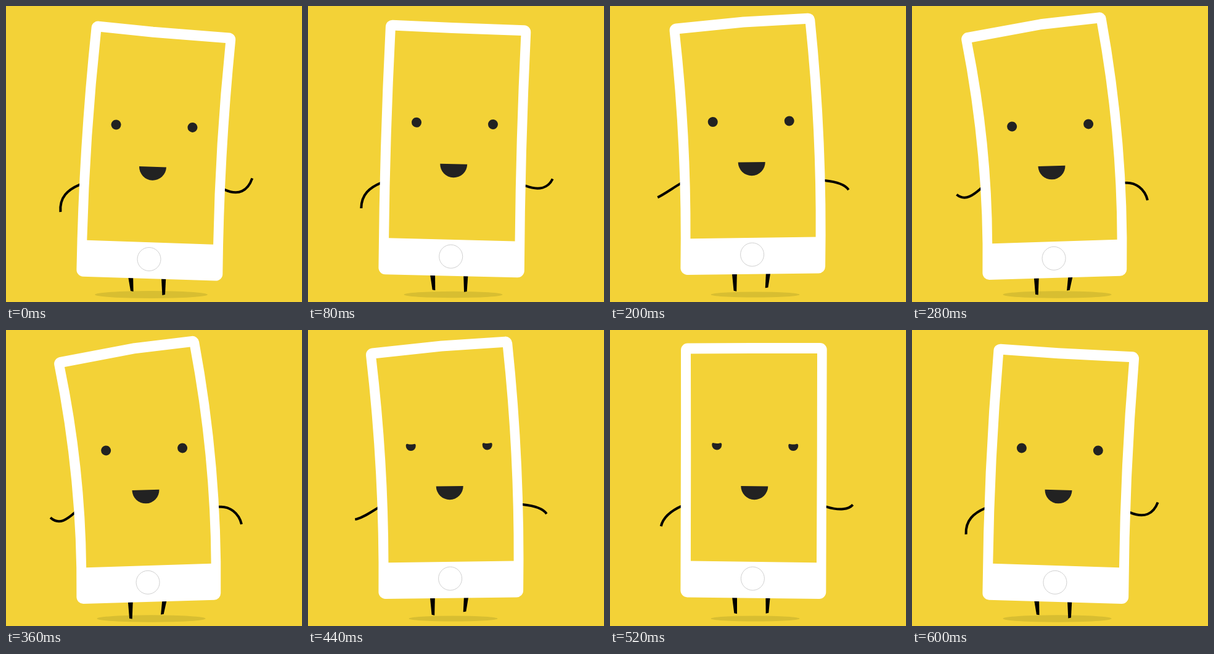
These frames come from a looping animation (480 px wide and 480 px high, 640 ms). An HTML page with a canvas:

```html
<!DOCTYPE html>
<html>
<head>
<meta charset="utf-8">
<style>
html, body { margin: 0; height: 100%; overflow: hidden; background: #f3d237; }
canvas { display: block; }
</style>
</head>
<body>
<canvas id="stage" width="480" height="480"></canvas>
<script>
const ctx = document.getElementById('stage').getContext('2d');
const YELLOW = '#f3d237', DARK = '#222';
const LOOP = 640, STEP = 40;

// Top corners of the screen: time, left x, left y, right x, right y
const TOP = [
  [0, 154, 42, 356, 60],
  [120, 133.5, 39.5, 338, 41],
  [200, 113, 45, 317, 29],
  [280, 97, 59, 300, 28],
  [320, 94, 61.5, 297.5, 28.5],
  [360, 95, 60, 298.5, 27.5],
  [440, 110.5, 46, 316, 28],
  [520, 131, 38.5, 336, 38],
  [600, 148, 40, 352, 52]
];

// Key i of the endless track, with its time unwrapped
function key(i) {
  const n = TOP.length, [time, ...values] = TOP[(i + n) % n];
  return { time: time + Math.floor(i / n) * LOOP, values };
}

// Smooth periodic curve through the keys
function topAt(t) {
  const i = TOP.findLastIndex(k => k[0] <= t);
  const [a, b, c, d] = [-1, 0, 1, 2].map(j => key(i + j));
  const span = c.time - b.time, u = (t - b.time) / span;
  return b.values.map((v, j) => {
    const m0 = (c.values[j] - a.values[j]) / (c.time - a.time) * span;
    const m1 = (d.values[j] - v) / (d.time - b.time) * span;
    const w = u * u * (3 - 2 * u);
    return v * (1 - w) + c.values[j] * w
      + m0 * u * (1 - u) ** 2 - m1 * u * u * (1 - u);
  });
}

function fill(path, color) {
  ctx.fillStyle = color;
  ctx.fill(new Path2D(path));
}

function stroke(path, color, width) {
  ctx.strokeStyle = color;
  ctx.lineWidth = width;
  ctx.stroke(new Path2D(path));
}

// Panel whose sides bow sideways from their chords
function panel(tl, mid, tr, br, bl, bow) {
  const bend = (top, bottom) =>
    [(top[0] + bottom[0]) / 2 + bow, (top[1] + bottom[1]) / 2];
  return `M${tl}L${mid}L${tr}Q${bend(tr, br)} ${br}L${bl}Q${bend(tl, bl)} ${tl}Z`;
}

function placed(x, y, degrees, draw) {
  ctx.save();
  ctx.translate(x, y);
  ctx.rotate(degrees * Math.PI / 180);
  draw();
  ctx.restore();
}

function draw(t) {
  const angle = t / LOOP * 2 * Math.PI;
  const p = Math.cos(angle), s = Math.sin(angle), q = p * p;
  const drop = 8.75 * q, tilt = 2 * p;
  const blink = Math.max(0, 1 - Math.abs(t - 480) / 80);
  // Base value plus sway, bounce and lag
  const mix = (base, sway, bounce = 0, lag = 0) =>
    base + sway * p + bounce * q + lag * s;

  ctx.fillStyle = YELLOW;
  ctx.fillRect(0, 0, 480, 480);

  ctx.fillStyle = '#d8be31';
  ctx.beginPath();
  ctx.ellipse(235.5, 468, 68.6 + 22.9 * q, 4.3 + 1.7 * q, 0, 0, 7);
  ctx.fill();

  // Legs
  const hip = 425 + drop;
  const footL = [mix(201, 1), mix(459.7, -3.4, 5.7)];
  const footR = [mix(252.2, 1.2), mix(457.2, 3.2, 8.5)];
  const hipR = mix(252.8, -1.2);
  fill(`M197.2 ${hip}L${footL}l4.6 .9L206 ${hip}Z`, '#000');
  fill(`M${hipR} ${hip}L${footR}l4.6 -.8L${hipR + 8} ${hip}Z`, '#000');

  // Arms
  const arm = (start, c1, c2, end, inset) =>
    stroke(`M${start[0] + inset} ${start[1]}L${start}C${c1} ${c2} ${end}`, '#000', 4);
  arm([mix(115.6, 3.7), mix(285.3, -3.6, 8.1)],
    [100.5, mix(292.8, -5, 9.9)],
    [86.5, mix(302.4, -5, 12.4)],
    [mix(80, 8.4, 0, .5), mix(313.4, 14.6, 6, 1.8)], 8);
  arm([mix(349.9, 4.5), mix(283.6, 5, 9.2)],
    [mix(369.5, 8), mix(287.8, 11, 9)],
    [mix(384.5, 7.5), mix(289, 1, 10)],
    [mix(390.3, 9), mix(289.4, -19.2, 9.2)], -8);

  // Body
  const [lx, ly, rx, ry] = topAt(t);
  const a = Math.atan2(ry - ly, rx - lx), cos = Math.cos(a), sin = Math.sin(a);
  const bow = 6.3 - 14.8 * p;
  const kx = 223 + 15 * p;
  const ky = ly + (ry - ly) * (kx - lx) / (rx - lx) - 1.3 + 2.5 * p;
  const shell = panel(
    [lx - 5 * cos + 6 * sin, ly - 5 * sin - 6 * cos],
    [kx, ky - 6],
    [rx + 4.7 * cos + 6 * sin, ry + 4.7 * sin - 6 * cos],
    [338.7 + 1.6 * p, 422.4 + drop + 3.4 * p],
    [125.4, 422.4 + drop - 3.4 * p], bow);
  ctx.lineJoin = 'round';
  fill(shell, '#fff');
  stroke(shell, '#fff', 22);
  fill(panel([lx, ly], [kx, ky], [rx, ry],
    [334.3 + 1.8 * p, 374.5 + drop + 3.6 * p],
    [130.7 + .6 * p, 374.5 + drop - 3.6 * p], bow * .8), YELLOW);

  ctx.beginPath();
  ctx.arc(231 + p, 401.8 + drop, 19, 0, 7);
  ctx.strokeStyle = '#d0d0d0';
  ctx.lineWidth = 1;
  ctx.stroke();

  // Face
  const lid = -8 + 11 * blink, side = -4.4 - 2.4 * blink, wide = 4.4 + 2 * blink;
  const eye = `M-8 0C-8 ${side} ${-wide} ${lid} 0 ${lid}C${wide} ${lid} 8 ${side} 8 0A8 8 0 0 1 -8 0Z`;
  placed(232 + 8.5 * p, 186 + drop, tilt, () => {
    for (const x of [-62, 62])
      placed(x, 0, 0, () => fill(eye, DARK));
  });
  placed(232 + 6 * p, 251.9 + drop, tilt, () => fill('M-22 0H22A22 22 0 0 1 -22 0Z', DARK));
}

function tick() {
  draw(Math.floor(performance.now() / STEP) * STEP % LOOP);
  requestAnimationFrame(tick);
}
tick();
</script>
</body>
</html>
```
